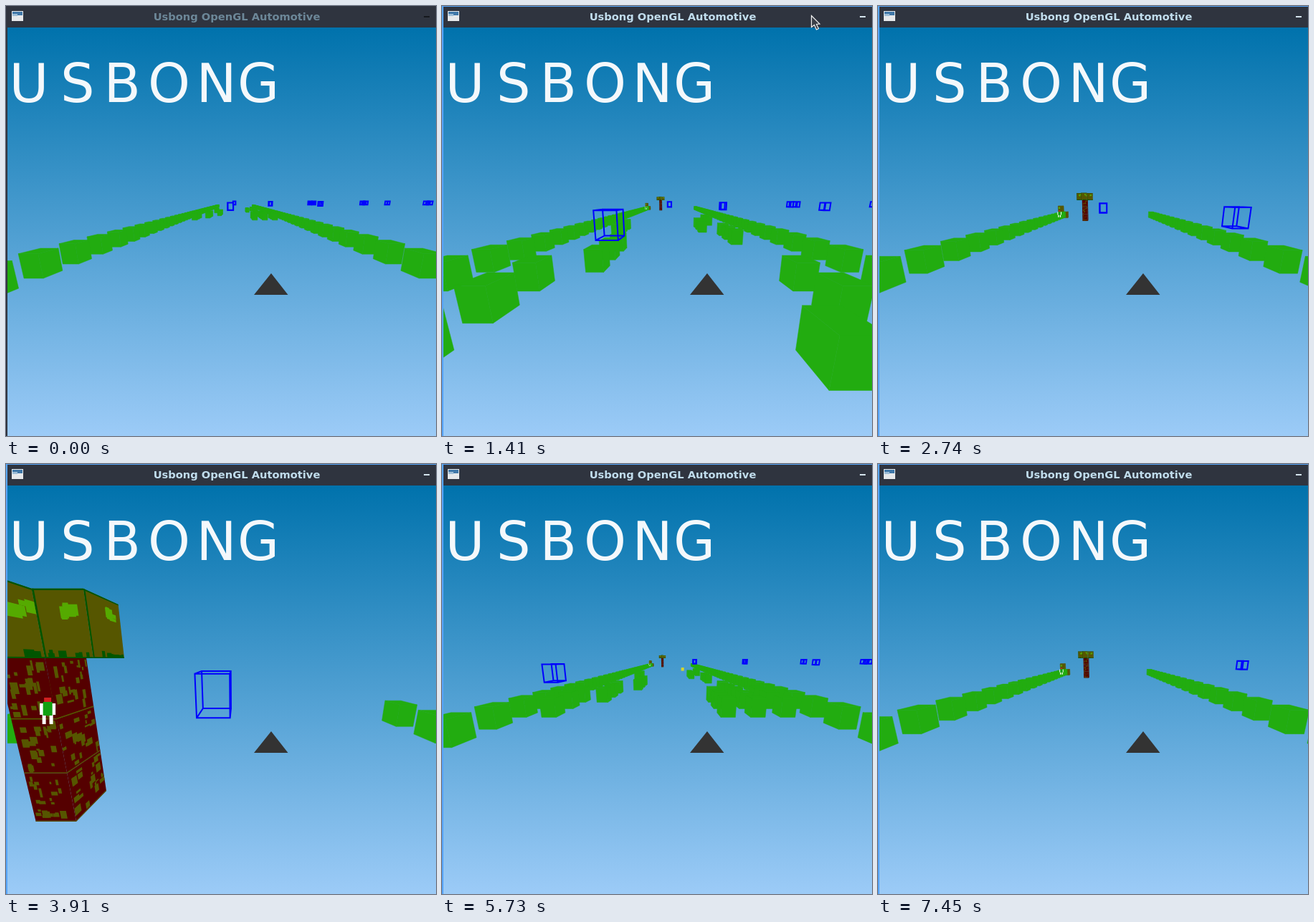
An HTML page with a canvas that plays this animation: 600 by 600 pixels, repeating every 7.47 s.

```html
<!DOCTYPE html>
<html lang="en">
<head>
<meta charset="utf-8">
<title>Usbong OpenGL Automotive</title>
<style>
html, body { margin: 0; width: 100%; height: 100%; overflow: hidden; background: #2f343f; }
canvas { display: block; width: 600px; height: 600px; }
</style>
</head>
<body>
<canvas id="c" width="600" height="600"></canvas>
<script>
const g = document.getElementById('c').getContext('2d');
const LOOP = 7470, STEP = 0.065, WRAP = 4.7, HIT = 6.2;
const CX = 321, HORIZON = 271, FX = 100, FY = 134.5;
const TILT = 0.097, DEPTH = 0.41, GAP = 0.83, FAR = 42;
const GREEN = '#22ac10', OLIVE = '#565600', LEAF = '#55aa00', SHADE = '#005500';
const BARK = '#550000', BLUE = '#0000ff';

// Time in s and distance to the end of the road; the road starts over at WRAP
const track = [
  [0, 45.2], [1.41, 30.57], [2.74, 16.4], [4.69, -3.88],
  [WRAP, 45.5], [6.38, 28.35], [7.45, 17.1], [7.47, 17.1]
];

// Lanes are evenly spaced; the outer two are full hedges, the others hold runs of three blocks
const laneX = i => -10.95 + 2.04 * i;
const runs = { 1: [35], 2: [25, 33], 3: [30], 7: [24, 35], 8: [21, 27, 33, 35], 9: [35] };

// Traffic of each lap: lead cars as distance, left edge, sideways speed; far cars by left edge
const CAR_SPEED = 6.74, FAR_CARS = 28.5;
const laps = [
  {
    from: 0,
    lead: [[12.7, -1.5, -1.35], [FAR_CARS, -1.18, 0], [23, 10.6, -1], [22.1, 25.7, 0.7]],
    far: [29, 30.6, 50, 51.3, 60, 75.5, 77]
  },
  {
    from: 4.9,
    lead: [[10.5, -8.4, -1.4], [FAR_CARS, 24.4, -1.35], [24.5, 38.6, 0]],
    far: [41, 60, 61.5, 67, 69]
  }
];

function random(seed) {
  return () => {
    seed = (seed * 1664525 + 1013904223) >>> 0;
    return seed / 4294967296;
  };
}

// x to the right, y below eye level, z distance at ground level
function project([x, y, z]) {
  const w = Math.max(0.3, z + TILT * (y - 3));
  return [CX + FX * x / w, HORIZON + FY * y / w];
}

function poly(points, color, edge = 0) {
  g.beginPath();
  points.forEach(p => g.lineTo(...project(p)));
  g.closePath();
  g.fillStyle = color;
  g.fill();
  if (edge) {
    g.strokeStyle = color;
    g.lineWidth = edge;
    g.stroke();
  }
}

// A painter for rectangles on a unit face that runs along x or into the depth
function faceAt(x, y, z, dx, dz) {
  const at = (u, v) => [x + u * dx, y + v, z + u * dz];
  return (u, v, w, h, color) =>
    poly([at(u, v), at(u + w, v), at(u + w, v + h), at(u, v + h)], color);
}
const frontFace = (x, y, z) => faceAt(x, y, z, 1, 0);
const sideFace = (x, y, z) => faceAt(x, y, z, 0, DEPTH);

function cube(x, y, z, color, width = 1, height = 1, depth = DEPTH) {
  const X = x + width, Y = y + height, Z = z + depth;
  const sx = X < 0 ? X : x;
  poly([[x, y, z], [X, y, z], [X, y, Z], [x, y, Z]], color, 0.5);
  if (x > 0 || X < 0) poly([[sx, y, z], [sx, y, Z], [sx, Y, Z], [sx, Y, z]], color, 0.5);
  poly([[x, y, z], [X, y, z], [X, Y, z], [x, Y, z]], color, 0.5);
}

function wireCube(x, z) {
  const y = 0.33, Y = 1.33, X = x + 1;
  const near = z + TILT * (3 - Y);
  const rings = [near, near + DEPTH].map(d =>
    [[x, y, d], [X, y, d], [X, Y, d], [x, Y, d]].map(project));
  g.strokeStyle = BLUE;
  g.lineWidth = 2;
  g.beginPath();
  for (const ring of rings) {
    ring.forEach((p, i) => i ? g.lineTo(...p) : g.moveTo(...p));
    g.closePath();
  }
  rings[0].forEach((p, i) => {
    g.moveTo(...p);
    g.lineTo(...rings[1][i]);
  });
  g.stroke();
}

function bark(face, seed) {
  const r = random(seed);
  face(0, 0, 1, 1, BARK);
  face(0, 0.98, 1, 0.02, OLIVE);
  for (let i = 0; i < 22; i++) {
    const w = 0.04 + r() * 0.13, h = 0.03 + r() * 0.16;
    face(r() * (1 - w), r() * (1 - h), w, h, OLIVE);
  }
}

function leaves(face, seed) {
  const r = random(seed);
  face(0, 0, 1, 1, OLIVE);
  for (let i = 0; i < 5; i++) {
    const w = 0.1 + r() * 0.25;
    face(1 - w - r() * 0.4, 0.12 + r() * 0.2, w, 0.04 + r() * 0.14, LEAF);
  }
  for (let i = 0; i < 8; i++) {
    const w = 0.05 + r() * 0.15, h = 0.03 + r() * 0.1;
    face(r() * (1 - w), 1 - h, w, h, SHADE);
  }
  face(0, 0, 0.04, 1, SHADE);
  face(0, 0, 1, 0.02, SHADE);
  face(0, 0.98, 1, 0.02, SHADE);
}

function tree(z) {
  const x = laneX(3) - 0.12;
  for (let j = 2; j >= 0; j--) {
    bark(sideFace(x + 1, j, z), 11 + j);
    bark(frontFace(x, j, z), 31 + j);
  }
  leaves(sideFace(x + 2, -1, z), 5);
  leaves(frontFace(x - 1, -1, z), 6);
  leaves(frontFace(x + 1, -1, z), 7);
  leaves(sideFace(x + 1, -1, z - DEPTH), 8);
  leaves(frontFace(x, -1, z - DEPTH), 9);
}

function hut(z) {
  cube(-11.3, 1, z, OLIVE, 1, 2);
  cube(-10.3, 2, z, OLIVE);
  const face = frontFace(-11.3, 1, z);
  face(0.1, 0.15, 0.35, 0.3, LEAF);
  face(0.55, 0.9, 0.3, 0.25, BARK);
}

function man(z) {
  const s = 4.23 / z;
  g.save();
  g.translate(CX - 263 * s, HORIZON + 92 * s);
  g.scale(s, s);
  const box = (color, x, y, w, h) => {
    g.fillStyle = color;
    g.fillRect(x, y, w, h);
  };
  for (const side of [-1, 1]) {
    box('#ffffff', side * 8.5 - 2.5, -29, 5, 16);
    box('#ffffff', side * 5 - 2.5, -13, 5, 13);
  }
  box('#10a010', -6.5, -31, 13, 19);
  box('#d02020', -5, -37, 10, 6);
  g.restore();
}

function debris(x, y, s) {
  g.fillStyle = '#00f0f0';
  for (let i = -1; i <= 1; i++) g.fillRect(x + 5 * i * s, y + 2.5 * i * s, 4, 2);
}

function scene(t, end) {
  const items = [];
  const add = (z, draw) => {
    if (z > 0.55 && z < FAR) items.push({ z, draw });
  };
  const block = (lane, row) => {
    const z = end - row * GAP;
    add(z, () => cube(laneX(lane), 2, z, GREEN));
  };
  const car = (z, x) => add(z, () => wireCube(x, z));

  for (let row = 0; row * GAP < end; row++) {
    block(0, row);
    block(10, row);
  }
  for (const lane in runs) {
    for (const row of runs[lane]) {
      for (let i = 0; i < 3; i++) block(+lane, row + i);
    }
  }
  const treeZ = end - 3 * GAP + 0.03;
  add(treeZ, () => tree(treeZ));
  add(end + 0.01, () => hut(end));

  const second = t >= WRAP, lap = laps[+second], dt = t - lap.from;
  const farZ = FAR_CARS - CAR_SPEED * dt;
  for (const [z, x, drift] of lap.lead) car(z - CAR_SPEED * dt, x + drift * dt);
  for (const x of lap.far) car(farZ, x * (1 + 0.05 * dt));

  // the car that gets shot, and the bullet
  if (second && t < HIT) car(farZ, 6.9);
  if (t > 4.89 && t < 6.5) {
    const z = 2.08 + 14.9 * dt;
    add(z, () => cube(1.78, 1.35, z, '#d6d62a', 0.42, 0.38, 0.12));
  }
  items.sort((a, b) => b.z - a.z).forEach(i => i.draw());
  if (end > 0.6 && end < FAR) man(end);
  if (t > HIT && t < HIT + 0.45) debris(361, 283, (t - HIT) / 0.18);
}

function sky() {
  const grad = g.createLinearGradient(0, 30, 0, 600);
  grad.addColorStop(0, '#0072ac');
  grad.addColorStop(1, '#9ccbf7');
  g.fillStyle = grad;
  g.fillRect(0, 0, 600, 600);
}

function wordmark() {
  g.font = '75px "DejaVu Sans", sans-serif';
  g.textAlign = 'left';
  g.fillStyle = '#f4f8fb';
  g.filter = 'blur(0.7px)';
  const xs = [4.5, 76, 136.5, 198, 265.5, 323];
  [...'USBONG'].forEach((ch, i) => g.fillText(ch, xs[i], 134));
  g.filter = 'none';
}

function ship() {
  g.fillStyle = '#333333';
  g.beginPath();
  g.moveTo(346, 403);
  g.lineTo(370, 373);
  g.lineTo(393.5, 403);
  g.fill();
}

function windowFrame(focused) {
  const rect = (color, x, y, w, h) => {
    g.fillStyle = color;
    g.fillRect(x, y, w, h);
  };
  rect('#2f343f', 0, 0, 600, 30);
  rect('#2f343f', 0, 0, 2, 600);
  if (focused) {
    rect('#56a4f8', 0, 0, 600, 1);
    rect('#56a4f8', 0, 0, 2, 600);
  }
  rect('#e6e8ea', 8, 7, 16, 14);
  rect('#3f77a8', 9, 8, 14, 5);
  rect('#9dbdd6', 9, 11, 7, 3);
  g.font = 'bold 14.67px "DejaVu Sans", sans-serif';
  g.textAlign = 'center';
  g.fillStyle = focused ? '#c0dcec' : '#6c8798';
  g.fillText('Usbong OpenGL Automotive', 322, 20);
  rect(focused ? '#d4e4ee' : '#15181d', 583, 14, 8, 2);
}

function cursor(x, y) {
  g.beginPath();
  for (const [dx, dy] of [[0, 0], [0, 16], [4, 13], [7, 19.5], [10, 18], [7, 12], [11.5, 11.5]]) {
    g.lineTo(x + dx, y + dy);
  }
  g.closePath();
  g.fillStyle = '#3a3f48';
  g.fill();
  g.strokeStyle = '#f0f0f0';
  g.lineWidth = 1.2;
  g.stroke();
}

// Snap to the display step and find how far the road end is
function locate(t) {
  let i = track.length - 2;
  while (track[i][0] > t + 1e-6) i--;
  const [a, d] = track[i], [b, e] = track[i + 1];
  const n = Math.max(1, Math.round((b - a) / STEP));
  const f = Math.floor((t - a) / (b - a) * n + 1e-4) / n;
  return [a + (b - a) * f, d + (e - d) * f];
}

function draw(ms) {
  const [t, end] = locate((ms % LOOP) / 1000);
  sky();
  wordmark();
  scene(t, end);
  ship();
  windowFrame(t > 1.2);
  if (t > 1.2 && t < 1.52) cursor(515.5, 13.5);
}

let start;
function tick(now) {
  if (start === undefined) start = now;
  draw(now - start);
  requestAnimationFrame(tick);
}
draw(0);
requestAnimationFrame(tick);
</script>
</body>
</html>
```
